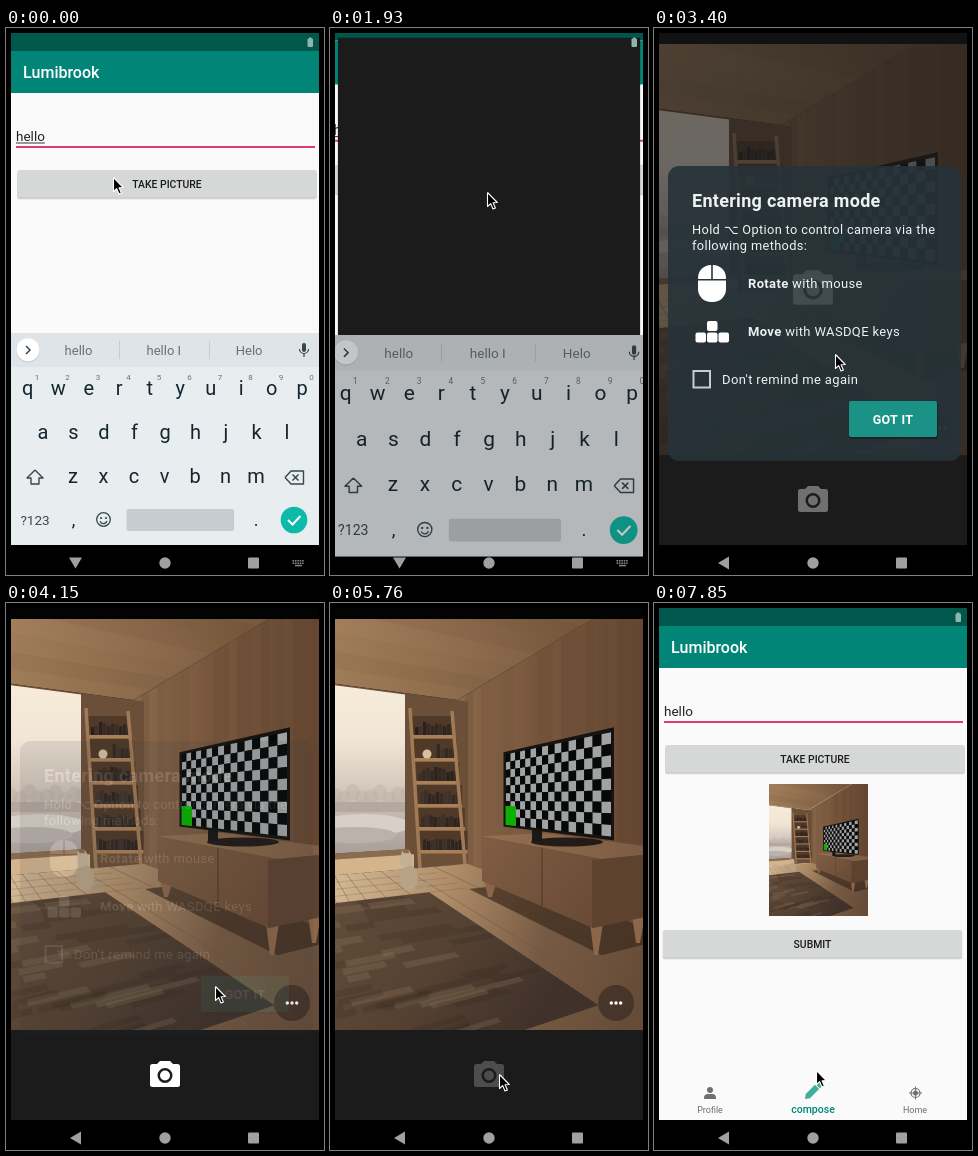
Recreate the animation shown at these times as an HTML page with a canvas. Size 318 by 547 pixels, loop 8 s.

```html
<!DOCTYPE html>
<html lang="en">
<head>
<meta charset="utf-8">
<title>Compose a post</title>
<style>
html, body { margin: 0; width: 100%; height: 100%; overflow: hidden; background: #000; }
canvas { display: block; }
</style>
</head>
<body>
<canvas id="stage" width="318" height="547"></canvas>
<script>
const stage = document.getElementById('stage');
const buffer = stage.cloneNode();
let c = stage.getContext('2d');
const LOOP = 8000, TICK = 147.6;
const MID_X = 159, MID_Y = 261;
const CAMERA_BG = '#1b1b1b';

const ramp = (n, from, to) => Math.max(0, Math.min(1, (n - from) / (to - from)));
const easeOut = u => 1 - (1 - u) ** 2;
const random = seed => {
  const v = Math.sin(seed * 12.9898) * 43758.5453;
  return v - Math.floor(v);
};

function rect(color, x, y, w, h, r = 0) {
  c.fillStyle = color;
  c.beginPath();
  c.roundRect(x, y, w, h, r);
  c.fill();
}
function disc(color, x, y, rx, ry = rx) {
  c.fillStyle = color;
  c.beginPath();
  c.ellipse(x, y, rx, ry, 0, 0, 7);
  c.fill();
}
function trace(p) {
  c.beginPath();
  for (let i = 0; i < p.length; i += 2) c.lineTo(p[i], p[i + 1]);
}
function poly(color, ...p) {
  c.fillStyle = color;
  trace(p);
  c.fill();
}
function line(color, width, ...p) {
  c.strokeStyle = color;
  c.lineWidth = width;
  trace(p);
  c.stroke();
}
function ring(color, width, x, y, r, from = 0, to = 7) {
  c.strokeStyle = color;
  c.lineWidth = width;
  c.beginPath();
  c.arc(x, y, r, from, to);
  c.stroke();
}
function text(s, x, y, size, color, { weight = 400, align = 'center', spacing = 0 } = {}) {
  c.font = `${weight} ${size}px Roboto, "DejaVu Sans", sans-serif`;
  c.letterSpacing = spacing + 'px';
  c.textAlign = align;
  c.fillStyle = color;
  c.fillText(s, x, y);
  return c.measureText(s).width;
}
function fade(x0, y0, x1, y1, ...colors) {
  const g = c.createLinearGradient(x0, y0, x1, y1);
  colors.forEach((color, i) => g.addColorStop(i / (colors.length - 1), color));
  return g;
}
function zoomed(scale, paint) {
  c.save();
  c.translate(MID_X, MID_Y);
  c.scale(scale, scale);
  c.translate(-MID_X, -MID_Y);
  paint();
  c.restore();
}
// Paints a group as one translucent picture.
function blended(alpha, paint) {
  if (alpha <= 0) return;
  if (alpha === 1) return paint();
  const target = c;
  c = buffer.getContext('2d');
  c.clearRect(0, 0, 318, 547);
  paint();
  c = target;
  c.save();
  c.globalAlpha = alpha;
  c.drawImage(buffer, 0, 0);
  c.restore();
}

function button(label, x, y, color = '#d6d7d7') {
  rect('#e3e3e3', x - .5, y + 1, 300, 28.5, 2);
  rect('#c4c5c5', x, y + 1, 299, 27.5, 2);
  rect(color, x, y, 299, 27.5, 2);
  text(label, x + 149.5, y + 18, 10.4, '#1c1c1c', { weight: 500 });
}

function bottomTabs() {
  const gray = '#707070';
  disc(gray, 56, 487, 3);
  rect(gray, 50, 491, 12, 5, [4, 4, 0, 0]);
  text('Profile', 56, 509.5, 9, gray);

  c.save();
  c.translate(151, 496);
  c.rotate(-Math.PI / 4);
  poly('#3fae9f', 0, 0, 4, -3, 17, -3, 17, 3, 4, 3);
  rect('#3fae9f', 18, -3, 4, 6, 1);
  c.restore();
  text('compose', 159, 509.5, 10.5, '#008577', { weight: 500 });

  ring(gray, 1.2, 261.5, 490, 4.5);
  disc(gray, 261.5, 490, 2.5);
  rect(gray, 261, 483.5, 1, 13);
  rect(gray, 255, 489.5, 13, 1);
  text('Home', 261, 509.5, 9, gray);
}

function app(n) {
  const posted = n >= 49;
  rect('#fafafa', 5, 5, 308, 512);
  rect('#00574b', 5, 5, 308, 18);
  rect('#008577', 5, 23, 308, 42);
  text('Lumibrook', 17, 50, 16, '#fff', { weight: 500, align: 'left' });
  const w = text('hello', 10, 113, 13.5, '#222', { align: 'left' });
  if (!posted) rect('#333', 10, 114.5, w, 1);
  rect('#e0387b', 10, 118, 299, 2);
  const caretOn = posted ? n < 53 : n % 6 >= 2 && n % 6 < 5;
  if (caretOn) rect('#d81b60', 38, 98, 2, 18);
  button('TAKE PICTURE', 11.5, 142, n >= 7 && n < 12 ? '#bdbebe' : undefined);
  if (!posted) return;
  c.save();
  c.translate(115, 181);
  c.scale(99 / 308, 132 / 411);
  c.translate(-5, -16);
  room();
  c.restore();
  button('SUBMIT', 9, 327);
  bottomTabs();
}

function keyboard(dim) {
  const ink = '#13262f', soft = '#66737a', icon = '#37474f';
  const row = (keys, x, y, size = 20, color = ink) =>
    [...keys].forEach((k, i) => text(k, x + i * 30.5, y, size, color));

  rect('#e8edf0', 5, 305, 308, 212);
  rect('#dfe4e8', 5, 305, 308, 34);
  disc('#cdd3d7', 22, 322.5, 12);
  disc('#fff', 22, 321.7, 11.5);
  line(icon, 1.5, 20, 318, 24, 322, 20, 326);
  ['hello', 'hello I', 'Helo'].forEach((word, i) => text(word, 72.5 + i * 85.3, 327, 13, soft));
  for (const x of [113, 203]) rect('#c6ccd0', x, 313, 1, 18);
  rect(icon, 296, 315, 4, 9, 2);
  ring(icon, 1.2, 298, 321, 4.5, 0, Math.PI);
  rect(icon, 297.4, 325, 1.2, 4);

  row('qwertyuiop', 21.7, 367);
  row('asdfghjkl', 37, 411);
  row('zxcvbnm', 67, 455);
  row('1234567890', 31, 352, 8, soft);

  c.lineJoin = 'round';
  line(icon, 1.4, 29, 442, 37, 450, 33, 450, 33, 456, 25, 456, 25, 450, 21, 450, 29, 442);
  line(icon, 1.4, 279, 449.5, 285, 443, 297.5, 443, 297.5, 456, 285, 456, 279, 449.5);
  for (const d of [-3, 3]) line(icon, 1.4, 289.5 - d, 446.5, 289.5 + d, 452.5);
  c.lineJoin = 'miter';

  text('?123', 29, 497, 13.5, icon);
  text(',', 67.5, 498, 18, ink);
  ring(icon, 1.3, 97.5, 491.5, 6.8);
  for (const d of [-2.5, 2.5]) disc(icon, 97.5 + d, 490, 1.1);
  ring(icon, 1.3, 97.5, 492, 3.6, .3, 2.8);
  rect('#c7ccd0', 120.5, 481, 107.5, 22, 2);
  text('.', 250, 498, 18, ink);
  disc('#0bbaa8', 288, 492, 13.3);
  line('#fff', 2, 282, 492, 286.5, 496.5, 294.5, 488);

  c.save();
  c.globalAlpha = dim;
  rect(CAMERA_BG, 5, 305, 308, 212);
  c.restore();
}

// Two-point perspective: every horizontal edge is a ray of some slope from one vanishing point.
const HORIZON = 197, LEFT_VP = -39, RIGHT_VP = 881;
const sideY = (x, slope) => HORIZON + slope * (x - LEFT_VP);
const backY = (x, slope) => HORIZON + slope * (RIGHT_VP - x);

function panel(heightAt, color, x0, x1, top, bottom) {
  poly(color, x0, heightAt(x0, top), x1, heightAt(x1, top), x1, heightAt(x1, bottom), x0, heightAt(x0, bottom));
}
const side = (...args) => panel(sideY, ...args);
const back = (...args) => panel(backY, ...args);

function meet(a, b) {
  const x = (RIGHT_VP * b + LEFT_VP * a) / (a + b);
  return [x, sideY(x, a)];
}
function level(color, a0, a1, b0, b1) {
  poly(color, ...meet(a0, b0), ...meet(a1, b0), ...meet(a1, b1), ...meet(a0, b1));
}

function walls() {
  side(fade(127, 0, 313, 0, '#8a684b', '#78583f', '#684a34'), 127, 313, -.6, .4);
  for (let i = 0; i < 24; i++) {
    const x = 127 + i * 8;
    side(`rgba(50,28,12,${.12 * random(i)})`, x, x + 8, -.6, .36);
  }
  level(fade(5, 90, 290, 16, '#a8845f', '#8f6d4e', '#745539'), -.6, -20, -.1326, -8);
  for (let i = 0; i < 9; i++) {
    const b = -.1326 * 1.13 ** i;
    level(`rgba(50,28,12,${.12 * random(i + 40)})`, -.6, -20, b, b * 1.13);
  }
  back('#6c4f38', 5, 138, -.1326, .086);
}

function windowView() {
  c.save();
  back(fade(0, 82, 0, 250, '#f6ead8', '#f1e5d6', '#cfc3b8', '#a99f9b'), 5, 75, -.131, .061);
  c.clip();
  for (let i = 0; i < 9; i++) disc('#b9aca466', 5 + i * 9, 193 + 4 * Math.sin(i * 2.3), 7, 8);
  rect('#b5a99f', 5, 199, 70, 10);
  disc('#d8d0c8', 34, 222, 46, 11);
  disc('#bbb2ab', 25, 232, 42, 8);
  c.restore();
  back('#8b6b4d', 5, 79, .061, .068);
  back('#d3b48d', 5, 84, .068, .086);
}

function shelf() {
  for (let i = 0; i < 6; i++) {
    const y = 133 + i * 23, x = 82 + i * 1.6, w = 42 + i * 1.1;
    rect('#513927', x, y - 20, w, 20);
    for (let k = 0; k < 10; k++) {
      const tone = 40 + 25 * random(i * 10 + k), h = 9 + 6 * random(i + k * 7);
      if (i !== 1 || k > 4) rect(`rgb(${tone},${tone * .8},${tone * .7})`, x + 3 + k * 4, y - h, 3.4, h);
    }
    rect('#a98058', x, y - 1, w, 3.4);
  }
  disc('#d8c0a0', 97, 151, 4.5);
  line('#a07a54', 3.5, 80, 105, 90, 265);
  line('#a07a54', 3.5, 122, 108, 135, 262);
}

function ground() {
  level(fade(5, 280, 313, 380, '#d2b894', '#b08d69', '#775a43', '#664c38'), .36, 30, .086, 8);
  for (let i = 0; i < 10; i++) {
    const a = .36 * 1.3 ** i;
    line('#6a503a70', 1, ...meet(a, .086), ...meet(a, 4));
  }
  for (let i = 1; i < 5; i++) line('#6a503a40', 1, ...meet(.5, .086 + i * .008), ...meet(30, .086 + i * .008));

  c.save();
  level(fade(5, 290, 200, 427, '#624c3b', '#564232', '#40312a'), .667, 30, .118, .335);
  c.clip();
  for (let i = 0; i < 70; i++) {
    const a = .66 * 7 ** random(i), b = .118 + .25 * random(i + 100);
    const color = random(i + 200) < .4 ? '#a78e7030' : '#2c201a30';
    level(color, a, a * (1.2 + random(i + 300)), b, b + .008);
  }
  c.restore();
}

function cat() {
  disc('#b8a388', 79, 275, 9, 13);
  disc('#c4b096', 76, 257, 6.5, 7);
  for (const x of [71, 78]) poly('#c4b096', x, 255, x + 1, 247, x + 5, 254);
  line('#a9947c', 3, 86, 285, 95, 283, 100, 277);
}

function cabinet() {
  const leg = (x, y, h) => poly('#8b6648', x - 6, y, x + 7, y, x + 2, y + h, x - 2, y + h);
  level('#38271caa', .36, .5, .12, .255);
  leg(160, 277, 17);
  leg(266, 320, 32);
  leg(308, 312, 28);
  level(fade(152, 0, 313, 0, '#94704f', '#7c5c43'), .19, .13, .0495, .097);
  side(fade(152, 240, 262, 320, '#7e5d43', '#694a34'), 152, 262, .19, .424);
  back('#5d4230', 262, 313, .097, .207);
  line('#4d3626', 1, 212, sideY(212, .19), 212, sideY(212, .424));
}

function television() {
  const cols = 16, rows = 9, left = 176, right = 281, top = -.212, bottom = .114;
  disc('#221b18', 237, 239, 36, 4.5);
  rect('#1b1715', 202, 225, 10, 13);
  side('#171311', 173.5, 284, -.225, .125);
  // Equal widths on the wall are equal steps of 1 / distance.
  const near = 1 / (left - LEFT_VP), far = 1 / (right - LEFT_VP);
  const columnX = i => LEFT_VP + 1 / (near + (far - near) * i / cols);
  const rowSlope = j => top + (bottom - top) * j / rows;
  for (let i = 0; i < cols; i++) for (let j = 0; j < rows; j++) {
    side((i + j) % 2 ? '#a0a3a4' : '#080808', columnX(i), columnX(i + 1), rowSlope(j), rowSlope(j + 1));
  }
  side('#0bb000', 175.5, 186, .028, .116);
}

function room() {
  c.save();
  c.beginPath();
  c.rect(5, 16, 308, 411);
  c.clip();
  walls();
  windowView();
  shelf();
  ground();
  cat();
  cabinet();
  television();
  c.restore();
}

function cameraIcon(x, y, scale, alpha) {
  c.save();
  c.globalAlpha = alpha;
  c.translate(x, y);
  c.scale(scale, scale);
  c.fillStyle = '#fff';
  c.beginPath();
  c.roundRect(-15, -10, 30, 23, 2.5);
  for (const r of [7.5, 5]) {
    c.moveTo(r, 1.5);
    c.arc(0, 1.5, r, 0, Math.PI * 2);
  }
  c.fill('evenodd');
  poly('#fff', -8, -10, -5, -13, 5, -13, 8, -10);
  c.restore();
}

function dialog() {
  const ink = '#eef1f2', left = { align: 'left', spacing: .35 };
  rect('rgba(38,50,57,.9)', 14, 138, 293, 295, 11);
  text('Entering camera mode', 38, 179, 18, ink, { weight: 700, align: 'left', spacing: .3 });
  text('Hold ⌥ Option to control camera via the', 38, 206, 12.8, ink, left);
  text('following methods:', 38, 222, 12.8, ink, left);

  rect('#fff', 44, 237, 28, 37, 13);
  rect('#2a363d', 44, 251, 28, 1.5);
  rect('#2a363d', 57.2, 237, 1.6, 15);
  rect('#fff', 53, 293, 10.5, 10, 2);
  for (let i = 0; i < 3; i++) rect('#fff', 41.5 + i * 11.5, 304.5, 10.5, 10, 2);

  const entry = (strong, rest, y) => {
    const w = text(strong, 94, y, 13, ink, { ...left, weight: 700 });
    text(rest, 94 + w, y, 13, ink, left);
  };
  entry('Rotate', ' with mouse', 260);
  entry('Move', ' with WASDQE keys', 308);

  c.strokeStyle = '#c6cccf';
  c.lineWidth = 2;
  c.strokeRect(39.5, 343, 16.5, 16.5);
  text("Don't remind me again", 68, 355.5, 13, ink, left);
  rect('rgba(0,0,0,.3)', 195, 374, 89, 37, 2);
  rect('#1a9386', 195, 373, 88, 36, 2);
  text('GOT IT', 239, 395.5, 12.5, '#fff', { weight: 700, spacing: .3 });
}

function viewfinder(n) {
  rect('#030303', 5, 5, 308, 11);
  room();
  if (n < 41) {
    disc('rgba(50,38,32,.6)', 286, 400, 18);
    for (let i = -1; i < 2; i++) disc('#fff', 286 + i * 4.7, 400, 1.7);
    cameraIcon(159, 471, 1, 1 - .78 * ramp(n, 33, 36));
  } else {
    line('#fff', 3, 149, 471, 156, 478, 170, 464);
  }
  blended(1 - ramp(n, 20, 28), () => rect(CAMERA_BG, 5, 5, 308, 512));
  blended(ramp(n, 20, 22) * (1 - ramp(n, 25, 28.4)), dialog);
}

function camera(n) {
  rect(CAMERA_BG, 5, 5, 308, 512);
  if (n >= 20) viewfinder(n);
  cameraIcon(159, 259.5, 1.33, .12 * ramp(n, 15, 18) * (1 - ramp(n, 23, 26)));
}

function navigation(n) {
  const gray = '#a0a0a0';
  c.save();
  c.translate(69.5, 535);
  c.rotate(Math.PI / 2 * ramp(n, 17, 21) ** 1.3);
  poly(gray, -6.5, -5.5, 6.5, -5.5, 0, 5.5);
  c.restore();
  disc(gray, 159, 535, 5.7);
  rect(gray, 242, 529.5, 11, 11, 1);
  if (n >= 16) return;
  for (let i = 0; i < 10; i++) rect('#858585', 286.5 + i % 5 * 2.4, i < 5 ? 532 : 534.4, 1.6, 1.6);
  rect('#858585', 289, 536.8, 7, 1.5);
}

// Each move: start tick, end tick, destination.
const MOVES = [[7, 13, 157, 164], [13, 18, 151, 264], [18, 23, 181, 326], [23, 28, 209, 383],
  [28, 31, 156, 476], [34, 39, 169, 471], [44, 47, 160, 471], [52, 53, 162, 467]];

function pointer(n) {
  let x = 107, y = 149;
  for (const [from, to, toX, toY] of MOVES) {
    const u = easeOut(ramp(n, from, to));
    x += (toX - x) * u;
    y += (toY - y) * u;
  }
  c.save();
  c.translate(x + .5, y + .5);
  c.lineJoin = 'round';
  const shape = [0, 0, 0, 14, 3.2, 11.1, 5.5, 16.5, 7.9, 15.5, 5.6, 10.2, 9.8, 10, 0, 0];
  poly('#000', ...shape);
  line('#fff', 1.1, ...shape);
  c.restore();
}

function draw(n) {
  rect('#000', 0, 0, 318, 547);
  c.save();
  c.beginPath();
  c.rect(5, 5, 308, 524);
  c.clip();
  const opening = 1 - (1 - ramp(n, 10, 14)) ** 1.5;
  const closing = ramp(n, 48, 51);
  const growth = n < 14 ? 1 + .05 * opening : 1;
  if (n < 14 || n >= 49) zoomed(growth, () => app(n));
  blended(ramp(n, 10, 12) * (1 - closing), () =>
    zoomed(.85 + .15 * opening - .08 * closing, () => camera(n)));
  if (n < 20) zoomed(growth, () => keyboard(ramp(n, 10.5, 20.5)));
  if (n < 15 || n >= 50) {
    rect('#8fb5af', 301.5, 10.5, 5.5, 8.5, 1);
    rect('#8fb5af', 303, 9.5, 2.5, 2);
  }
  c.restore();
  navigation(n);
  pointer(n);
}

function loop() {
  draw(Math.floor(performance.now() % LOOP / TICK));
  requestAnimationFrame(loop);
}
loop();
</script>
</body>
</html>
```
